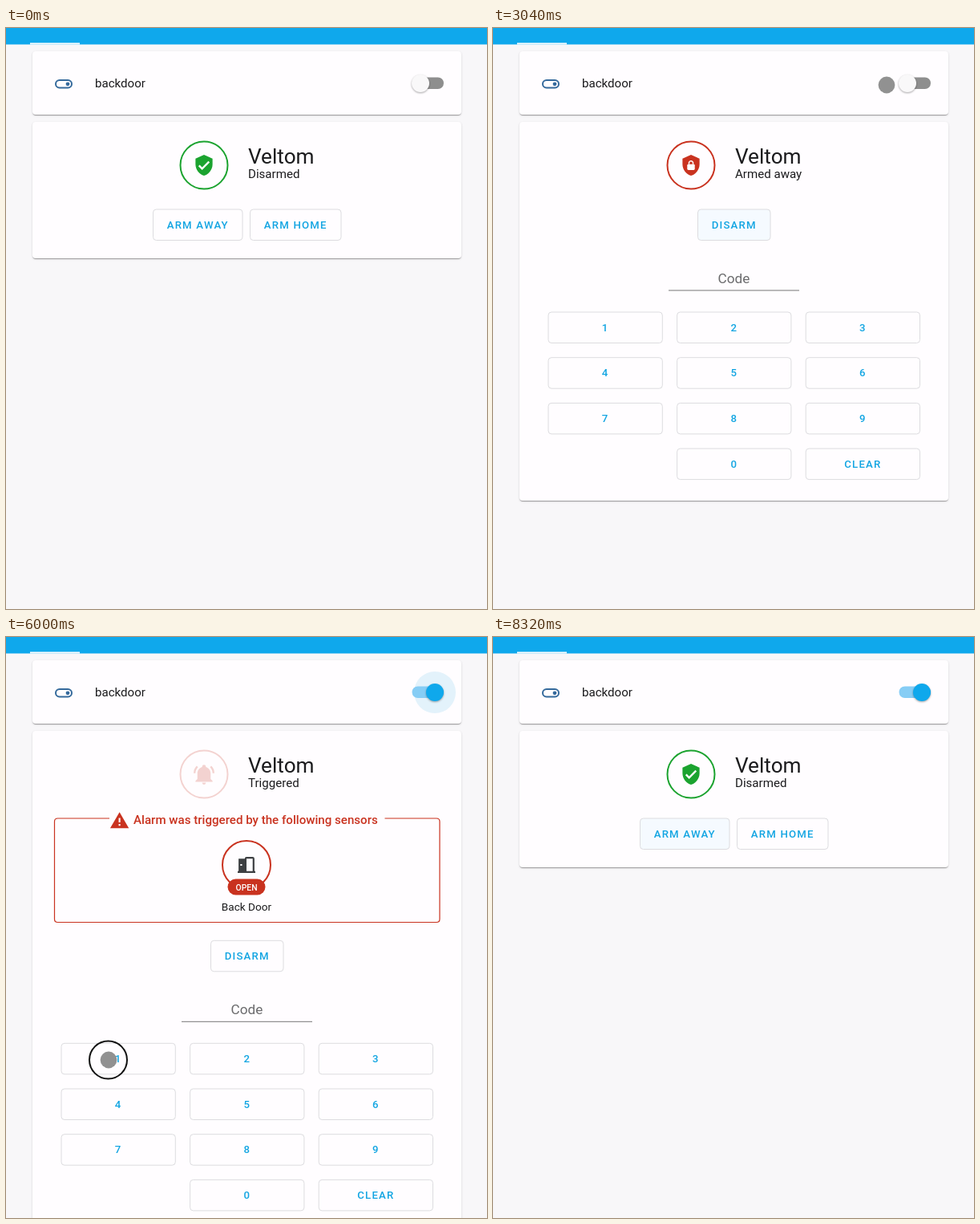
An HTML page for the animation above (8.4 s loop, 600 by 724 pixels).

```html
<!DOCTYPE html>
<html lang="en">
<head>
<meta charset="utf-8">
<title>Alarm panel</title>
<style>
html, body { margin: 0; width: 100%; height: 100%; overflow: hidden; background: #f8f7f9; }
.card {
  position: absolute; left: 33px; width: 535px; border-radius: 4px; background: #fffdff;
  box-shadow: 0 2px 1px -1px rgba(0,0,0,.2), 0 1px 1px rgba(0,0,0,.14), 0 1px 3px rgba(0,0,0,.12);
}
svg { position: absolute; left: 0; top: 0; font-family: Roboto, sans-serif; }
.btn { font-size: 13.2px; font-weight: 500; letter-spacing: 1.18px; fill: #12a5e2; }
.mid { text-anchor: middle; }
</style>
</head>
<body>
<div class="card" style="top:29px;height:78.5px"></div>
<div class="card" id="panel" style="top:116.5px"></div>
<svg id="view" width="600" height="724" viewBox="0 0 600 724"></svg>
<script>
const LOOP = 8400, STEP = 80, COUNT = 2000;
const BLUE = '#0fa8ec', RED = '#c9321f', GREEN = '#1ba32f', INK = '#1b1b1d';
const SHIELD = 'M12 1L3 5V11C3 16.55 6.84 21.74 12 23C17.16 21.74 21 16.55 21 11V5Z';
const view = document.getElementById('view');
const panel = document.getElementById('panel');

// Start time of each alarm state
const STATES = [
  [0, 'Disarmed'], [680, 'Arming'], [2680, 'Armed away'],
  [3370, 'Pending'], [5370, 'Triggered'], [7680, 'Disarmed']
];
// Pointer stops: time, x, y
const PATH = [
  [160, 262, 360], [400, 223, 247], [2720, 223, 247], [3040, 491, 71], [3200, 534, 69],
  [3560, 534, 69], [3920, 96, 185], [5440, 96, 185], [5840, 128, 527], [6080, 128, 527],
  [6240, 290, 528], [6400, 290, 528], [6560, 440, 528], [6720, 440, 528], [6960, 158, 591],
  [7040, 148, 588], [7200, 148, 588], [7440, 295, 400], [7920, 295, 400], [8080, 620, 380]
];
const CLICKS = [560, 3280, 5920, 6320, 6640, 7120, 7520];
const KEYS = [6080, 6400, 6720, 7200];

const smooth = x => x * x * (3 - 2 * x);
const within = (t, a, b) => t >= a && t < b;

const text = (s, x, y, size, fill = INK, extra = '') =>
  `<text x="${x}" y="${y}" font-size="${size}" fill="${fill}" ${extra}>${s}</text>`;
const circle = (x, y, r, fill, extra = '') =>
  `<circle cx="${x}" cy="${y}" r="${r}" fill="${fill}" ${extra}/>`;
const ring = (x, y, r, color, extra = '') =>
  circle(x, y, r, 'none', `stroke="${color}" stroke-width="2" ${extra}`);
const rect = (x, y, w, h, r, fill, extra = '') =>
  `<rect x="${x}" y="${y}" width="${w}" height="${h}" rx="${r}" fill="${fill}" ${extra}/>`;
const icon = (x, y, scale, body, fill) =>
  `<g transform="translate(${x} ${y}) scale(${scale}) translate(-12 -12)" fill="${fill}">${body}</g>`;
const button = (label, x, y, w, tint = 0) =>
  rect(x + .5, y, w, 38.5, 4, BLUE, `fill-opacity="${tint}" stroke="#dcdcdf"`) +
  `<text class="btn mid" x="${x + .5 + w / 2}" y="${y + 23.7}">${label}</text>`;

function header() {
  return rect(0, 0, 600, 20.5, 0, BLUE) + rect(30, 18.5, 62, 2, 0, '#fff');
}

function switchRow(t) {
  const p = Math.min(1, Math.max(0, (t - 3280) / 80));
  const x = 517 + 18 * p;
  return rect(62, 65, 20, 9.5, 4.75, 'none', 'stroke="#356a9c" stroke-width="2"') +
    circle(77, 69.8, 2.4, '#356a9c') +
    text('backdoor', 111, 74, 15.1) +
    (within(t, 3360, 6080) ? circle(535, 69, 26, '#e3f2fb') : '') +
    rect(506.5, 61.5, 39.5, 14.5, 7.2, p ? '#86cdf5' : '#8e8e8e') +
    circle(x, 69, 11, p ? BLUE : '#f9f8f9', 'filter="drop-shadow(0 1px 1.2px rgba(0,0,0,.35))"');
}

function countdown(left) {
  return ring(247, 171, 29.5, '#cbcbcd') +
    ring(247, 171, 29.5, BLUE,
      `pathLength="1" stroke-dasharray="${left} 2" transform="rotate(-90 247 171)"`) +
    text(Math.max(1, Math.ceil(left * 5)), 247, 179, 22.7, '#12a5e2',
      'class="mid" font-weight="500"');
}

function badge(state, since) {
  if (state === 'Arming' || state === 'Pending') return countdown(1 - since / COUNT);
  const color = state === 'Disarmed' ? GREEN : RED;
  let body = `<path d="${SHIELD}"/>`, opacity = 1;
  if (state === 'Disarmed') {
    body += '<path d="M6.7 12.3L10 15.6L17.3 8.3" fill="none" stroke="#fff" stroke-width="2"/>';
  } else if (state === 'Armed away') {
    body += rect(8, 11, 8, 6, 1.2, '#fff') +
      '<path d="M9.85 11V9.5A2.15 1.9 0 0 1 14.15 9.5V11" fill="none" stroke="#fff" stroke-width="1.3"/>';
  } else {
    body = '<path d="M21 19V20H3V19L5 17V11C5 7.9 7 5.2 10 4.3V4A2 2 0 0 1 14 4V4.3' +
      'C17 5.2 19 7.9 19 11V17ZM14 21A2 2 0 0 1 10 21Z"/>' +
      '<path d="M19 3.9A10 10 0 0 1 22 11M5 3.9A10 10 0 0 0 2 11" fill="none" stroke="' +
      RED + '" stroke-width="2"/>';
    const phase = since % 400 / 200;
    const ease = smooth((phase % 1) ** .65);
    opacity = phase < 1 ? 1 - ease : ease;
  }
  return `<g opacity="${opacity}">${ring(247, 171, 29.5, color)}${icon(247, 171, 1.18, body, color)}</g>`;
}

function sensors() {
  const alert = '<path fill-rule="evenodd" d="M1 21H23L12 2ZM11 9H13V14H11ZM11 16H13V18H11Z"/>';
  const door = '<path fill-rule="evenodd" d="M12 3Q10 3 10 5H3V19H2V21H22V19H21V5Q21 3 19 3Z' +
    'M12 5H19V19H12ZM5 11H7V13H5Z"/>';
  return `<path d="M129 226H64.5Q60.5 226 60.5 230V351.5Q60.5 355.5 64.5 355.5H537Q541 355.5 541 351.5
    V230Q541 226 537 226H472.5" fill="none" stroke="${RED}" stroke-width="1.2"/>` +
    icon(141.6, 228.8, 1.06, alert, RED) +
    text('Alarm was triggered by the following sensors', 159, 233, 15.1, RED, 'font-weight="500"') +
    ring(300, 284, 30, RED) +
    icon(300, 284, 1.1, door, '#3d3f42') +
    rect(276.5, 301.5, 47, 20, 10, RED) +
    text('OPEN', 300, 315.6, 10.4, '#fff', 'class="mid" font-weight="500"') +
    text('Back Door', 300, 341, 13.6, INK, 'class="mid"');
}

function keypad(t, shift, disarmTint) {
  const typed = KEYS.filter(k => t >= k).length;
  let out = button('DISARM', 255, 226, 90.5, disarmTint);
  out += typed
    ? text('Code', 300, 294.5, 12.9, '#6b6b6d', 'class="mid"')
    : text('Code', 300.5, 318, 17.2, '#6b6b6d', 'class="mid"');
  for (let i = 0; i < typed; i++) out += circle(300.5 + (i - (typed - 1) / 2) * 5.8, 312, 2.2, INK);
  out += rect(219, 326.5, 163, 1, 0, '#777');
  ['1', '2', '3', '4', '5', '6', '7', '8', '9', '', '0', 'CLEAR'].forEach((label, i) => {
    const focused = typed === i + 1 && t < 7520;
    if (label) out += button(label, 68.5 + i % 3 * 160.6, 354 + Math.floor(i / 3) * 56.7, 142.3, focused ? .12 : 0);
  });
  return `<g transform="translate(0 ${shift})">${out}</g>`;
}

function pointer(t) {
  const i = PATH.findIndex(p => p[0] > t);
  if (i < 1) return '';
  const [t0, x0, y0] = PATH[i - 1], [t1, x1, y1] = PATH[i];
  const k = smooth((t - t0) / (t1 - t0));
  const x = x0 + (x1 - x0) * k, y = y0 + (y1 - y0) * k;
  const pressed = CLICKS.some(c => within(t, c, c + 120));
  return circle(x, y, 10.4, '#8d8d8d', 'fill-opacity=".97"') +
    (pressed ? ring(x - .5, y, 23.5, '#111') : '');
}

function draw(t) {
  const [start, state] = STATES.filter(s => s[0] <= t).pop();
  const triggered = state === 'Triggered', disarmed = state === 'Disarmed';
  const tint = within(t, 600, 3360) || t >= 7600 ? .04 : 0;
  panel.style.height = (disarmed ? 170 : triggered ? 624.5 : 472.5) + 'px';
  view.innerHTML = header() + switchRow(t) + badge(state, t - start) +
    text('Veltom', 302, 168.7, 26.2) + text(state, 302, 187.3, 15.1) +
    (triggered ? sensors() : '') +
    (disarmed
      ? button('ARM AWAY', 183, 226, 111.5, tint) + button('ARM HOME', 304, 226, 113.5)
      : keypad(t, triggered ? 152.3 : 0, tint)) +
    pointer(t);
}

let begin, last;
function tick(now) {
  begin ??= now;
  const t = Math.floor((now - begin) % LOOP / STEP) * STEP;
  if (t !== last) draw(last = t);
  requestAnimationFrame(tick);
}
draw(0);
requestAnimationFrame(tick);
</script>
</body>
</html>
```
